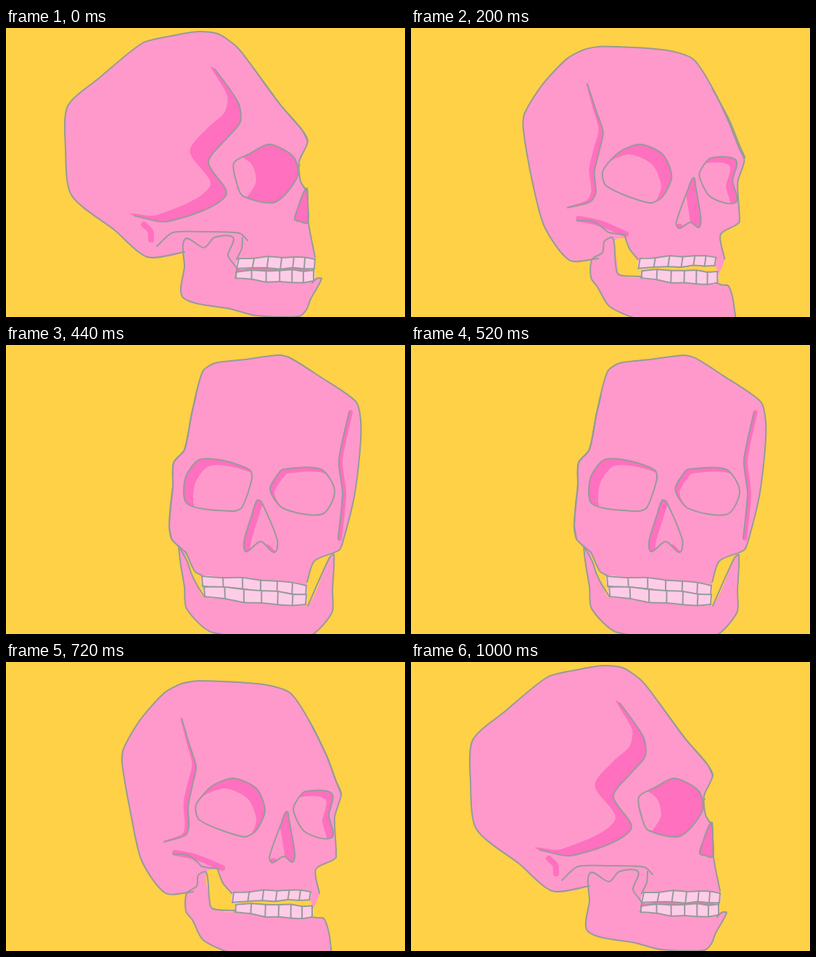
These frames come from a looping animation (550 px wide and 400 px high, 1.04 s). An HTML page with a canvas:

```html
<!DOCTYPE html>
<html lang="en">
<head>
<meta charset="utf-8">
<title>Turning skull</title>
<style>
html, body { margin: 0; width: 100%; height: 100%; overflow: hidden; background: #ffd147; }
canvas { display: block; }
</style>
</head>
<body>
<canvas id="stage" width="550" height="400"></canvas>
<script>
const LOOP = 1040, STEP = 40;
const YELLOW = '#ffd147', PINK = '#ff99cb', DARK = '#ff70bf', TOOTH = '#ffcce8', GREY = '#999999';

// How far the head has turned: 0 profile, 1 three-quarter, 2 front.
const TURN = [[0, 0], [200, 0.93], [440, 2], [500, 2.12], [600, 1.5], [720, 1], [880, 0.48], [1000, 0], [LOOP, 0]];

// Landmarks of each part in the three views.
const PARTS = {
  head: [
    '246,310 195,317 150,280 90,231 82,165 85,108 130,68 188,21 228,11 265,5 292,8 318,26 340,54 378,106 408,141 416,157 404,185 406,212 415,228 417,270 426,317',
    '258,318 220,320 187,275 173,215 160,140 162,120 185,80 218,43 242,30 268,26 355,31 392,43 420,85 442,130 455,165 462,183 453,215 455,270 449,275 427,287 432,320',
    '236,277 228,268 225,250 230,195 231,163 246,145 256,95 271,37 288,25 330,20 376,14 392,18 430,42 482,78 489,105 488,145 480,210 465,270 459,284 425,299 415,328'],
  jaw: [
    '316,346 318,333 306,315 313,290 287,290 273,304 247,292 246,330 244,373 310,389 345,398 404,399 414,390 420,375 435,347 428,347 422,353',
    '317,344 284,341 280,325 276,291 265,295 263,310 249,320 248,345 257,357 272,385 318,404 446,404 447,388 444,370 438,355 430,354 420,353',
    '273,348 262,330 255,315 250,300 243,287 240,282 238,278 241,305 246,335 249,365 285,398 415,404 449,371 450,340 452,290 446,294 416,361'],
  upper: ['326,290 325,305 318,320', '292,288 299,306 311,320', '248,287 260,313 270,319'],
  cheek: ['208,302 230,283 270,282 322,284 333,294', '230,266 250,267 264,277 270,283 292,286', '236,277 238,279 241,281 243,283 248,287'],
  hollow: ['190,272 199,281 200,293', '233,264 262,270 298,285', '236,277 238,279 241,281'],
  temple: [
    '177,260 222,268 303,232 279,186 305,152 323,130 320,103 288,57',
    '218,249 247,240 252,228 251,200 257,170 262,145 253,115 242,78',
    '228,268 225,250 227,220 230,195 231,163 246,145 256,95 262,70'],
  side: ['340,54 378,106 408,141 416,157', '420,85 442,130 455,165 462,183', '473,93 459,160 464,205 458,268'],
  eyeL: [
    '314,187 336,174 363,161 396,178 402,205 371,241 327,233 319,218',
    '262,198 285,171 314,161 345,175 357,205 345,233 328,242 267,219',
    '247,185 266,159 300,160 336,173 339,185 325,225 312,230 250,220'],
  eyeR: [
    '405,190 405,190 405,190 405,190 405,190 405,190 405,190',
    '396,205 402,190 413,179 449,182 445,212 449,243 412,235',
    '364,200 374,180 382,172 434,172 453,202 436,234 382,226'],
  nose: [
    '411,226 402,250 398,265 406,268 415,270 417,262 416,245 415,222',
    '387,207 380,222 363,270 367,278 383,269 395,277 398,265 390,218',
    '346,215 339,235 328,272 331,286 351,272 370,287 374,270 352,217'],
  // Left and right end of each gum and biting edge, from top to bottom.
  teeth: [
    '321,319 426,319 318,332 425,333 317,337 424,336 317,346 424,351',
    '314,319 420,317 312,332 418,329 317,335 422,338 316,346 422,354',
    '270,320 414,332 271,333 413,346 273,334 414,346 274,348 413,360'],
  // Where the lit part of each hole moves: left eye, right eye, nose.
  light: ['-58,10 0,0 -22,0', '-12,14 -9,8 -14,2', '13,9 6,6 9,4']
};
for (const name in PARTS) {
  PARTS[name] = PARTS[name].map(view => view.split(' ').map(p => p.split(',').map(Number)));
}

const ctx = document.getElementById('stage').getContext('2d');
ctx.lineCap = ctx.lineJoin = 'round';

const mix = (a, b, s) => a.map((v, i) => v + (b[i] - v) * s);
const shift = (pts, dx, dy) => pts.map(([x, y]) => [x + dx, y + dy]);

function turnAt(t) {
  const i = TURN.findIndex(key => key[0] > t), [a, b] = [TURN[i - 1], TURN[i]];
  return a[1] + (b[1] - a[1]) * (t - a[0]) / (b[0] - a[0]);
}

// Parabola through the three views.
function pose(u) {
  const weights = [(1 - u) * (2 - u) / 2, u * (2 - u), u * (u - 1) / 2], out = {};
  for (const [name, views] of Object.entries(PARTS)) {
    out[name] = views[0].map((_, i) => [0, 1].map(c =>
      weights.reduce((sum, w, v) => sum + w * views[v][i][c], 0)));
  }
  return out;
}

// Path with rounded corners; handle length follows the length of each side.
function curve(pts, closed = false) {
  const n = pts.length;
  const at = i => closed ? pts[(i + n) % n] : pts[Math.max(0, Math.min(n - 1, i))];
  const handle = (i, len) => {
    const a = at(i - 1), b = at(i + 1), d = Math.hypot(b[0] - a[0], b[1] - a[1]) || 1;
    return [(b[0] - a[0]) / d * len, (b[1] - a[1]) / d * len];
  };
  const path = new Path2D();
  path.moveTo(...pts[0]);
  for (let i = 0; i < (closed ? n : n - 1); i++) {
    const a = at(i), b = at(i + 1), len = Math.hypot(b[0] - a[0], b[1] - a[1]) * 0.25;
    const u = handle(i, len), v = handle(i + 1, len);
    path.bezierCurveTo(a[0] + u[0], a[1] + u[1], b[0] - v[0], b[1] - v[1], ...b);
  }
  return path;
}
function fill(pts, color) {
  ctx.fillStyle = color;
  ctx.fill(curve(pts, true));
}
function stroke(pts, { color = GREY, width = 2, closed = false } = {}) {
  if (width <= 0) return;
  ctx.strokeStyle = color;
  ctx.lineWidth = width;
  ctx.stroke(curve(pts, closed));
}

function hole(pts, light) {
  fill(pts, DARK);
  ctx.save();
  ctx.clip(curve(pts, true));
  fill(shift(pts, ...light), PINK);
  ctx.restore();
  stroke(pts, { closed: true });
}

// Uneven edge of a row of teeth, wider on the near side.
function gumEdge(left, right, bulge, seed) {
  const count = 6;
  return Array.from({ length: count + 1 }, (_, i) => {
    const s = i / count, [x, y] = mix(left, right, s * (1.25 - 0.25 * s));
    return [x, y + bulge * Math.sin(Math.PI * s) + Math.sin(i * 2.4 + seed)];
  });
}
function toothRow(top, bottom) {
  fill([...top, ...bottom.slice().reverse()], TOOTH);
  stroke(top);
  stroke(bottom);
  top.forEach((p, i) => stroke([p, bottom[i]]));
}

function draw(t) {
  const u = turnAt(t), p = pose(u);
  ctx.fillStyle = YELLOW;
  ctx.fillRect(0, 0, 550, 400);

  fill([...p.head, ...p.jaw.slice(6).reverse()], PINK);
  fill(p.jaw, PINK);
  const corner = p.jaw[0], open = Math.min(1, u);
  fill([...p.upper, ...p.jaw.slice(0, 4)].map(q => mix(corner, q, open)), YELLOW);

  const depth = 26 * (1 - u / 2) ** 2, last = p.temple.length - 1;
  const rim = p.temple.map(([x, y], i) => {
    const d = depth * Math.sin(Math.PI * (i + 0.6) / (last + 1.2));
    return [x - d, y - d * 0.6];
  });
  fill([...p.temple, ...rim.reverse()], DARK);
  stroke(p.hollow, { color: DARK, width: 8 * Math.min(1, 2 - u) });
  stroke(shift(p.side, 2, 0), { color: DARK, width: 6 * (u - 1) });

  hole(p.eyeL, p.light[0]);
  hole(p.eyeR, p.light[1]);
  hole(p.nose, p.light[2]);

  const [topA, topB, lowA, lowB] = [-2, 0, -1, 3].map((bulge, i) =>
    gumEdge(p.teeth[2 * i], p.teeth[2 * i + 1], bulge, i));
  fill([...topB, ...lowA.slice().reverse()], u < 0.3 ? DARK : YELLOW);
  toothRow(topA, topB);
  toothRow(lowA, lowB);

  for (const name of ['head', 'jaw', 'cheek', 'upper', 'temple', 'side']) stroke(p[name]);
}

const start = performance.now();
let shown = -1;
function tick() {
  const t = Math.floor((performance.now() - start) % LOOP / STEP) * STEP;
  if (t !== shown) draw(shown = t);
  requestAnimationFrame(tick);
}
tick();
</script>
</body>
</html>
```
